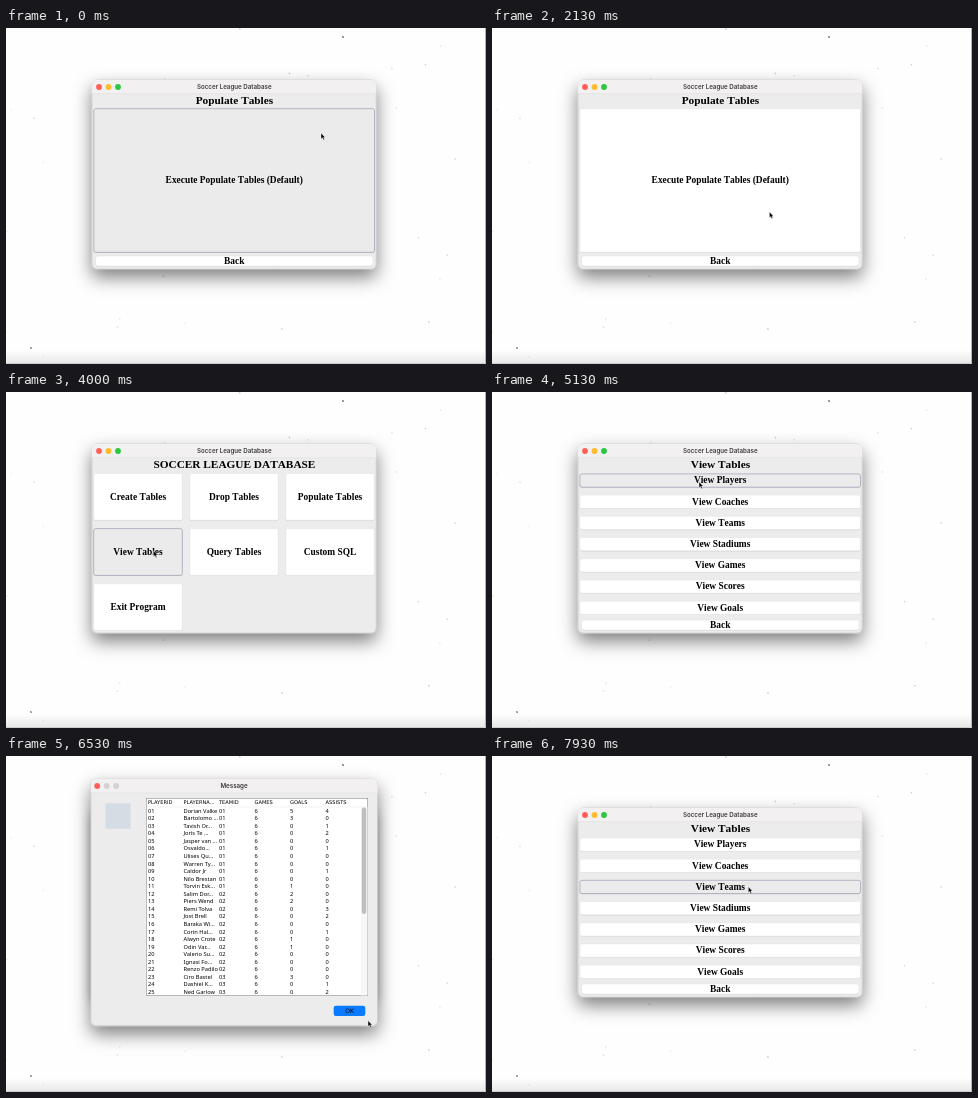
Recreate the animation shown at these times as an HTML page. Size 480 by 336 pixels, loop 8000 ms.

```html
<!DOCTYPE html>
<html lang="en">
<head>
<meta charset="utf-8">
<title>League database</title>
<style>
html, body { margin: 0; width: 100%; height: 100%; overflow: hidden; background: #fefefe; }
svg { display: block; width: 480px; height: 336px; }
text { fill: #000; white-space: pre; }
.serif { font: bold 9.42px "Liberation Serif", serif; font-kerning: none; text-anchor: middle; }
.head { font-size: 11.3px; }
.bar { font: 600 6.2px Inter, sans-serif; text-anchor: middle; fill: #3c3c3c; }
.ui { font: 6px "DejaVu Sans", sans-serif; }
.cell { font: 5.7px "Noto Sans", sans-serif; }
.th { font-size: 5.1px; }
.mid { text-anchor: middle; }
</style>
</head>
<body>
<svg id="stage" viewBox="0 0 480 336" xmlns="http://www.w3.org/2000/svg"></svg>
<script>
const LOOP = 8000, FPS = 0.015;

const rect = (x, y, w, h, fill, r = 0, more = '') =>
  `<rect x="${x}" y="${y}" width="${w}" height="${h}" rx="${r}" fill="${fill}" ${more}/>`;
const text = (x, y, s, cls, more = '') => `<text x="${x}" y="${y}" class="${cls}" ${more}>${s}</text>`;
const group = (id, body) => `<g id="${id}">${body}</g>`;

const lamps = (x, y, fills, cls = '') => fills.map((f, i) =>
  `<circle cx="${x + i * 9.5}" cy="${y}" r="2.9" fill="${f}" class="${cls}"/>`).join('');

const button = (x, y, w, h, label, id, r = 2) =>
  rect(x, y + .6, w, h, '#d6d6d6', r) +
  rect(x, y, w, h, '#fff', r, `id="${id}" stroke="#e0e0e0" stroke-width=".5"`) +
  text(x + w / 2, y + h / 2 + 2.8, label, 'serif');

const page = (id, title, body) => group(id, text(228.4, 75.6, title, 'serif head') + body);

// Frame of a window: shadow, body and title bar.
function frame(id, x, y, w, h) {
  const r = 5;
  return rect(x, y, w, h, '#ececec', r, `id="${id}" filter="url(#deep)" stroke="#b5b5b5" stroke-width=".5"`) +
    `<path id="${id}Bar" d="M${x} ${y + 14}V${y + r}q0 -${r} ${r} -${r}H${x + w - r}q${r} 0 ${r} ${r}V${y + 14}Z" fill="#f2f0f0"/>` +
    rect(x, y + 13.7, w, .5, '#dcdada');
}

function dialog(id, x, y, w, h, iconY, body) {
  const okX = x + w - 43.9, okY = y + h - 20;
  return group(id, frame(id + 'Win', x, y, w, h) +
    lamps(x + 6.3, y + 7, ['#ff5f57', '#d3d1d1', '#d3d1d1']) +
    text(228, y + 9.1, 'Message', 'bar') +
    rect(x + 14.7, iconY, 25, 25.5, '#d5dce3') + body +
    rect(okX, okY, 31.6, 10.2, '#0a7aff', 2.2, `id="${id}Ok"`) +
    text(okX + 15.8, okY + 7.3, 'OK', 'ui mid', 'fill="#03142e"'));
}

// Desktop dust: faint seeded specks and two dark ones.
let seed = 7;
const rnd = () => (seed = seed * 16807 % 2147483647) / 2147483647;
const speck = (x, y, a) =>
  `<ellipse cx="${x}" cy="${y}" rx=".7" ry="1" fill="#222" opacity="${a}" transform="rotate(-30 ${x} ${y})"/>`;
const dust = speck(337, 9, .9) + speck(25, 320, .8) +
  Array.from({ length: 40 }, () => speck(rnd() * 478, rnd() * 330, .05 + rnd() * .2)).join('');

const menu = ['Create Tables', 'Drop Tables', 'Populate Tables', 'View Tables', 'Query Tables', 'Custom SQL', 'Exit Program']
  .map((s, i) => button(87.7 + i % 3 * 96, 81.5 + Math.floor(i / 3) * 55.1, 88.6, 46.8, s, 'menu' + i)).join('');

const views = ['Players', 'Coaches', 'Teams', 'Stadiums', 'Games', 'Scores', 'Goals']
  .map((s, i) => button(87.9, 81.9 + i * 21.2, 280.6, 13.3, 'View ' + s, 'view' + i)).join('');

// Name, goals, assists; a missing count is zero.
const players = [
  'Dorian Valke|5|4', 'Bartolomo ...|3', 'Tavish Or...||1', 'Joris Te ...||2', 'Jasper van ...',
  'Osvaldo...||1', 'Ulises Qu...', 'Warren Ty...', 'Caldor Jr||1', 'Nilo Brestan',
  'Torvin Esk...|1', 'Salim Dor...|2', 'Piers Wend|2', 'Remi Tolva||3', 'Jost Brell||2',
  'Baraka Wi...', 'Corin Hal...||1', 'Alwyn Crote|1', 'Odin Var...|1', 'Valerio Su...',
  'Ignasi Fo...', 'Renzo Padilo', 'Ciro Bastel|3', 'Dashiel K...||1', 'Ned Garlow||2'
];
const line = (y, cells, cls) => cells.map((s, i) => text(142 + i * 35.5, y, s, cls)).join('');
const pad = n => String(n).padStart(2, '0');
const table =
  rect(140.3, 42.3, 221.4, 197.4, '#fff', 0, 'stroke="#8e8e8e" stroke-width=".6"') +
  rect(355, 51, 6.4, 188.4, '#f7f7f7') + rect(355.8, 51.5, 4.4, 106.5, '#bfbfbf', 2.2) +
  rect(140.6, 50.8, 220.8, .4, '#dedede') +
  line(48.4, ['PLAYERID', 'PLAYERNA...', 'TEAMID', 'GAMES', 'GOALS', 'ASSISTS'], 'ui th') +
  players.map((p, i) => {
    const [name, goals, assists] = p.split('|');
    const team = 1 + Math.floor(i / 11);
    return line(56.7 + i * 7.55, [pad(i + 1), name, pad(team), 6, goals || 0, assists || 0], 'cell');
  }).join('');

const hues = ['#ff5f57', '#febc2e', '#28c840'];
const shadow = (id, dy, blur, alpha) =>
  `<filter id="${id}" x="-30%" y="-30%" width="160%" height="170%"><feDropShadow dx="0" dy="${dy}" stdDeviation="${blur}" flood-opacity="${alpha}"/></filter>`;

document.getElementById('stage').innerHTML =
  `<defs>${shadow('deep', 8, 9, .5)}${shadow('soft', 5, 6, .36)}
    <linearGradient id="edge" x2="0" y2="1"><stop stop-opacity="0"/><stop offset="1" stop-opacity=".09"/></linearGradient>
  </defs>` +
  rect(0, 0, 480, 336, '#fefefe') + dust + rect(0, 322, 480, 14, 'url(#edge)') +
  rect(479, 0, 1, 336, '#b4b4b4') + rect(0, 335, 480, 1, '#cdcdcd') +
  frame('win', 86, 51.9, 284.2, 189.2) +
  lamps(93, 59, hues, 'lamp') +
  text(228.3, 61.1, 'Soccer League Database', 'bar', 'id="caption"') +
  page('populate', 'Populate Tables', button(87.9, 80.7, 280.6, 143.6, 'Execute Populate Tables (Default)', 'run')) +
  page('main', 'SOCCER LEAGUE DATABASE', menu) +
  page('list', 'View Tables', views) +
  group('foot', button(89.5, 228, 277.5, 10, 'Back', 'back', 2.5)) +
  dialog('done', 149.4, 112, 156.9, 82, 136.3, text(205.3, 150, 'Tables populated successfully!', 'ui')) +
  dialog('rows', 84.9, 23, 286.7, 246.8, 47.3, table) +
  `<path id="cursor" d="M0 0V6L1.4 4.8L2.4 7L3.5 6.5L2.5 4.4H4.2Z" fill="#000" stroke="#fff" stroke-width=".45"/>`;

const $ = id => document.getElementById(id);
const lampEls = [...document.querySelectorAll('.lamp')];

const within = (t, a, b) => t >= a && t < b;
const ramp = (t, a, b) => Math.min(1, Math.max(0, (t - a) / (b - a)));
const ease = k => k * k * (3 - 2 * k);
const show = (id, on) => { $(id).style.display = on ? '' : 'none'; };
const fade = (id, v) => { show(id, v > 0); $(id).setAttribute('opacity', v); };
const fill = (id, c) => $(id).setAttribute('fill', c);

function press(id, on) {
  fill(id, on ? '#ebebec' : '#fff');
  $(id).setAttribute('stroke', on ? '#7f7f9c' : '#e0e0e0');
}

// Pointer moves, each from where the last one ended.
const moves = [
  { from: 1067, to: 1400, x: 275, y: 193.5 },
  { from: 1400, to: 1600, x: 278, y: 180 },
  { from: 2067, to: 2467, x: 269.5, y: 233 },
  { from: 3000, to: 3800, x: 147.5, y: 158.7 },
  { from: 4133, to: 4667, x: 207, y: 89.7 },
  { from: 5867, to: 6000, x: 384.5, y: 257.5 },
  { from: 6200, to: 6533, x: 362, y: 264.5 },
  { from: 6533, to: 6733, x: 344, y: 259.5 },
  { from: 7133, to: 7800, x: 256.3, y: 130.7 }
];
function pointer(t) {
  let x = 315, y = 105;
  for (const m of moves) {
    const k = ease(ramp(t, m.from, m.to));
    x += (m.x - x) * k;
    y += (m.y - y) * k;
  }
  return `translate(${x.toFixed(2)} ${y.toFixed(2)})`;
}

function draw(ms) {
  const t = Math.round(Math.floor((ms % LOOP) * FPS + .1) / FPS);
  const active = !within(t, 600, 1800) && !within(t, 5600, 6933);

  show('populate', t < 2733);
  show('main', within(t, 2733, 4133));
  show('list', t >= 4133);
  show('foot', !within(t, 2733, 4133));

  press('run', t < 600);
  press('back', within(t, 2533, 2733));
  press('menu3', within(t, 4000, 4133));
  press('view0', within(t, 5130, 7200));
  press('view2', t >= 7930);

  $('win').setAttribute('filter', active ? 'url(#deep)' : 'url(#soft)');
  fill('winBar', active ? '#f2f0f0' : '#e5e3e3');
  $('caption').style.fill = active ? '' : '#a2a2a2';
  lampEls.forEach((l, i) => l.setAttribute('fill', active ? hues[i] : '#cac8c8'));

  fade('done', ramp(t, 600, 800) * (1 - ramp(t, 1667, 1867)));
  fade('rows', ramp(t, 5533, 5667) * (1 - ramp(t, 6867, 7000)));
  fill('doneOk', within(t, 1600, 1733) ? '#0563d0' : '#0a7aff');
  fill('rowsOk', within(t, 6800, 6933) ? '#0563d0' : '#0a7aff');

  $('cursor').setAttribute('transform', pointer(t));
}

const start = performance.now();
function tick() {
  draw(performance.now() - start);
  requestAnimationFrame(tick);
}
tick();
</script>
</body>
</html>
```
